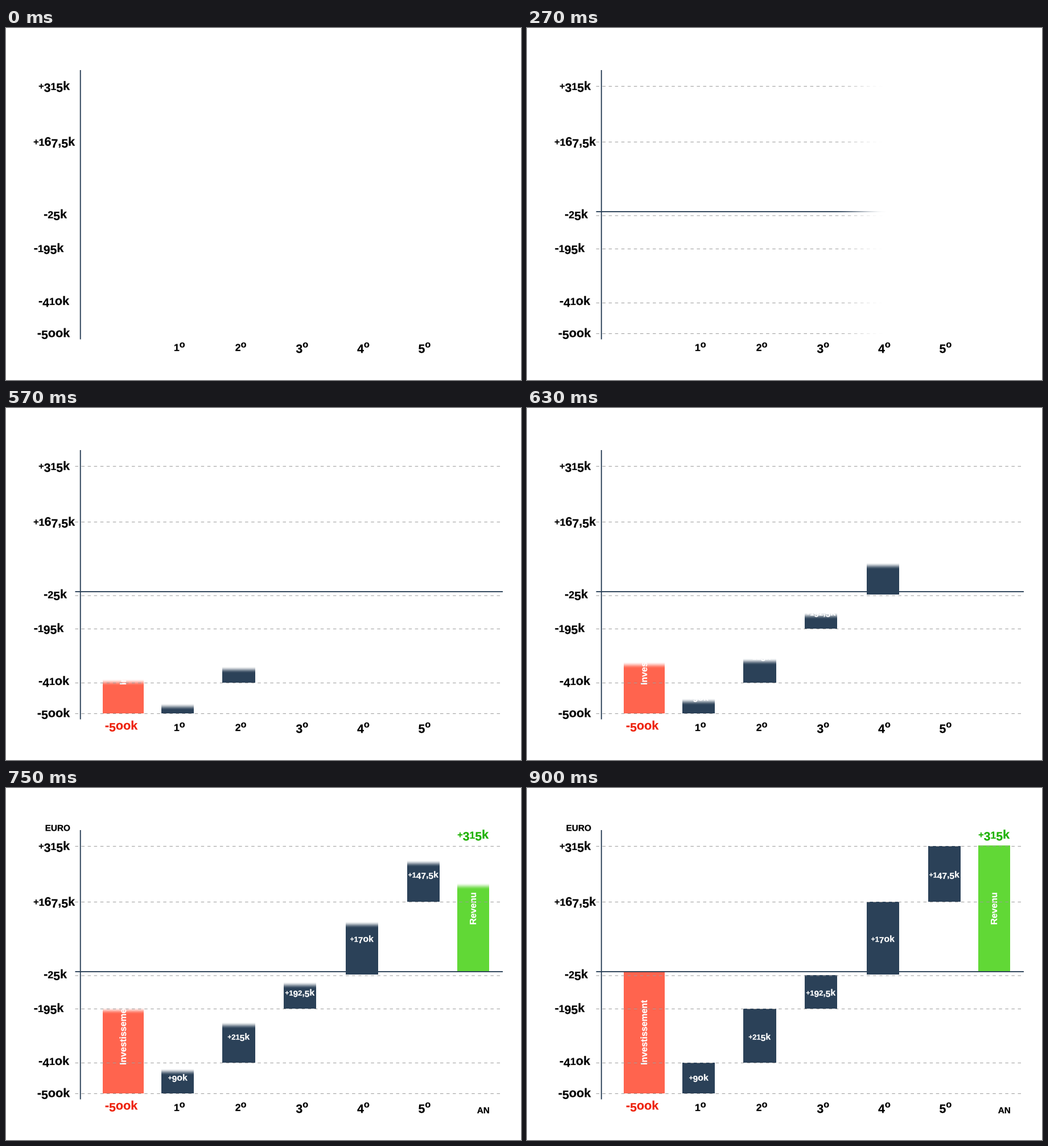
Animation of 905x619 px, one loop 0.93 s. Source, as a matplotlib script:

```python
import numpy as np
import matplotlib.pyplot as plt
from matplotlib.animation import FuncAnimation
from matplotlib.colors import to_rgb
from matplotlib.patches import PathPatch
from matplotlib.path import Path
from matplotlib.textpath import TextPath
from matplotlib.transforms import Affine2D

W, H, DPI = 905, 619, 100
PX = 72 / DPI
FRAMES, INTERVAL = 31, 30
BUILD = 15  # frames per wipe

NAVY, RED, GREEN = "#2b4158", "#ff644e", "#61d836"
FONT = {"family": "Liberation Sans", "weight": "bold"}
BIG, SMALL = 21.6, 15.8
LEFT, RIGHT = 121.5, 873
LINE_FEATHER, BAR_FEATHER = 95, 12

fig = plt.figure(figsize=(W / DPI, H / DPI), dpi=DPI, facecolor="white")
ax = fig.add_axes([0, 0, 1, 1])
ax.axis("off")


def glyph_style(char):
    """Old-style figures: glyph, scale and rise in em."""
    if char in "12":
        return char, 0.82, 0
    if char in "34579":
        return char, 0.98, -0.15
    return {"0": ("o", 1, 0), "º": ("o", 0.75, 0.29),
            "+": ("+", 0.75, 0.06)}.get(char, (char, 1, 0))


def right_edge(text, size):
    return TextPath((0, 0), text, size=size, prop=FONT).get_extents().x1


def text_path(text, size):
    """Outline of the text, centred on x = 0 with its baseline on y = 0."""
    parts, x = [], 0
    for char in text:
        glyph, scale, rise = glyph_style(char)
        s = size * scale
        parts.append(TextPath((x, rise * size), glyph, size=s, prop=FONT))
        x += right_edge(glyph + "|", s) - right_edge("|", s)
    path = Path.make_compound_path(*parts)
    box = path.get_extents()
    return path.transformed(Affine2D().translate(-(box.x0 + box.x1) / 2, 0))


def label(text, x, y, size=BIG, color="black", angle=0, z=6):
    place = Affine2D().rotate_deg(angle).scale(1, -1).translate(x, y)
    patch = PathPatch(text_path(text, size).transformed(place), facecolor=color,
                      edgecolor=color, linewidth=0.25 * PX, zorder=z)
    return ax.add_patch(patch)


def line(xs, ys, width, color=NAVY, z=3, **style):
    # Snapping would push odd-width lines to the next pixel row.
    ax.plot(xs, ys, color=color, lw=width * PX, zorder=z, snap=False,
            solid_capstyle="butt", dash_capstyle="butt", **style)


def soft_wipe(dist, length, feather, progress):
    """Opacity at a distance along a feathered linear wipe."""
    t = np.clip(((length + feather) * progress - dist) / feather, 0, 1)
    return t * t * (3 - 2 * t)


class Bar:
    def __init__(self, x0, x1, top, bottom, color, start, text, tx, ty, angle=0):
        self.start, self.height = start, bottom - top
        rows = int(round(self.height * 2))
        self.dist = self.height * (1 - (np.arange(rows) + 0.5) / rows)
        self.rgba = np.ones((rows, 1, 4))
        self.rgba[..., :3] = to_rgb(color)
        self.image = ax.imshow(self.rgba, extent=(x0, x1, bottom, top),
                               aspect="auto", interpolation="nearest", zorder=1)
        self.text = label(text, tx, ty, SMALL, "white", angle, z=2)

    def update(self, frame):
        shown = frame >= self.start
        self.image.set_visible(shown)
        self.text.set_visible(shown)
        progress = (frame - BUILD) / BUILD
        self.rgba[:, 0, 3] = soft_wipe(self.dist, self.height, BAR_FEATHER, progress)
        self.image.set_data(self.rgba)


bars = [
    Bar(170, 241, 323, 537.5, RED, 16, "Investissement", 211, 429.5, 90),
    Bar(273, 330, 484, 537.5, NAVY, 18, "+90k", 302, 514.5),
    Bar(380, 437.5, 388.5, 483.5, NAVY, 19, "+215k", 409, 442.5),
    Bar(488, 545, 330, 388.5, NAVY, 20, "+192,5k", 516.5, 365),
    Bar(597, 654, 200.5, 328.5, NAVY, 21, "+170k", 625.5, 270.5),
    Bar(705, 762, 102.5, 200, NAVY, 22, "+147,5k", 733.5, 157.5),
    Bar(793, 849, 101, 323, GREEN, 23, "Revenu", 826, 212, 90),
]

# Grid, zero line and vertical axis
for y in (102.5, 200.5, 330, 388.5, 483.5, 537.5):
    line([LEFT, 870], [y, y], 1, "#9c9c9c", linestyle=(0, (5.5, 5.56)))
line([LEFT, RIGHT], [323, 323], 1.9)
line([130.75, 130.75], [74, 547.5], 1.9, z=5)

# White cover that uncovers the horizontal lines
cover = np.ones((1, W - 120, 4))
cover_x = np.arange(120, W) + 0.5 - LEFT
cover_image = ax.imshow(cover, extent=(120, W, H, 0), aspect="auto",
                        interpolation="nearest", zorder=4)

for text, x, y in (("+315k", 85, 109), ("+167,5k", 85, 207),
                   ("-25k", 87, 334.5), ("-195k", 75.5, 394),
                   ("-410k", 84.5, 487), ("-500k", 84, 543.5)):
    label(text, x, y)
for i in range(5):
    label(f"{i + 1}º", 305 + 107.6 * i, 568)

# Labels that pop in: (first frame, patch)
popups = [
    (17, label("-500k", 203, 565.5, color="#ee220c")),
    (23, label("+315k", 821, 89, color="#1db100")),
    (23, label("AN", 838.5, 572, 15.3)),
    (24, label("EURO", 91, 75.5, 15.3)),
]

ax.set_xlim(0, W)
ax.set_ylim(H, 0)


def draw(frame):
    progress = min(frame / BUILD, 1)
    cover[0, :, 3] = 1 - soft_wipe(cover_x, RIGHT - LEFT, LINE_FEATHER, progress)
    if frame >= BUILD:
        cover[..., 3] = 0
    cover_image.set_data(cover)
    for bar in bars:
        bar.update(frame)
    for start, patch in popups:
        patch.set_visible(frame >= start)
    return []


anim = FuncAnimation(fig, draw, frames=FRAMES, init_func=lambda: draw(0),
                     interval=INTERVAL, repeat=True, repeat_delay=0, blit=False)
plt.show()
```
